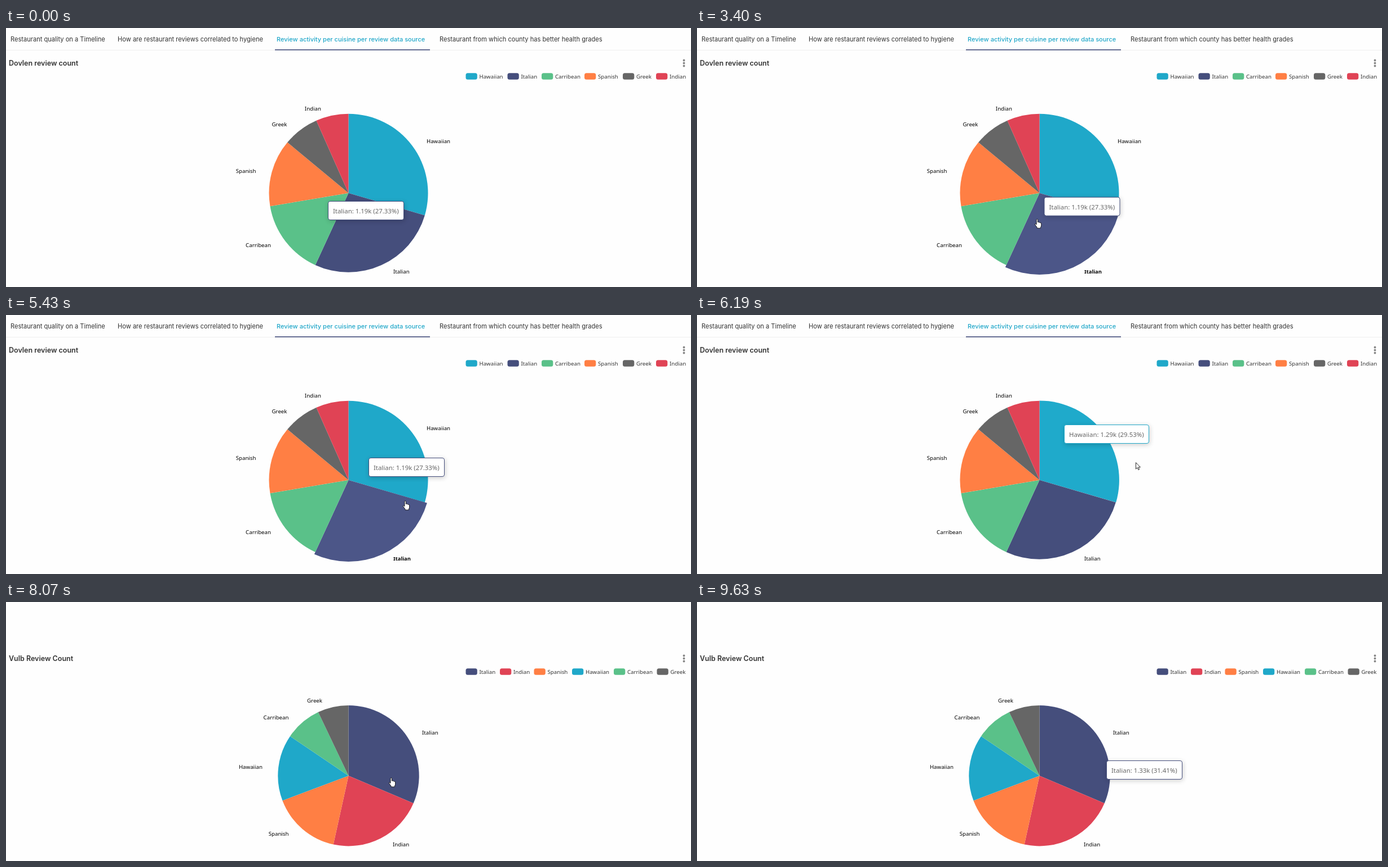
Recreate the animation shown at these times as an HTML page. Size 1215 px wide and 461 px high, loop 9.68 s.

```html
<!DOCTYPE html>
<html lang="en">
<head>
<meta charset="utf-8">
<title>Review activity</title>
<style>
  html, body { margin: 0; width: 100%; height: 100%; overflow: hidden; background: #fefefe; }
  #stage { position: relative; width: 1215px; height: 461px; overflow: hidden; }
  #page { position: absolute; left: 0; top: 0; }
  svg { display: block; }
  .tab { font: 400 11.1px Inter, sans-serif; fill: #323232; }
  .tab.on { fill: #20a7c9; font-weight: 500; font-size: 11px; }
  .title { font: 600 12.5px Inter, sans-serif; fill: #333; }
  .legend { font: 9.7px "Noto Sans", sans-serif; fill: #333; }
  .label { font: 9.7px "Noto Sans", sans-serif; fill: #000; }
  .label.on { font-weight: 700; font-size: 9.4px; }
  #tip {
    position: absolute; left: 0; top: 0; box-sizing: border-box; height: 34px;
    padding: 1px 8px 0; border: 1px solid; border-radius: 4px; background: #fff;
    box-shadow: 1px 2px 9px rgba(0, 0, 0, .2);
    font: 11.4px/32px "Noto Sans", sans-serif; color: #666; white-space: nowrap;
  }
  #pointer { position: absolute; left: 0; top: 0; overflow: visible; }
  #pointer path { fill: #fff; stroke: #111; stroke-width: .9; stroke-linejoin: round; }
</style>
</head>
<body>
<div id="stage">
  <div id="page">
    <svg id="art" width="1215" height="910"></svg>
    <div id="tip"></div>
  </div>
  <svg id="pointer" width="1" height="1">
    <path id="arrow" d="M0 0V11.5L2.7 9L4.4 13L6.2 12.2L4.5 8.3H8Z"/>
    <path id="hand" d="M-1 1.3Q-1 0 .2 0T1.4 1.3V5.3Q2.7 4.6 3.6 5.8Q4.9 5.2 5.8 6.5Q7.6 6.2 7.6 8V11Q7.6 13 6.4 14.2V16H0V14.5L-3.6 9.6Q-4 8.2-2.6 8.2L-1 9.6Z"/>
  </svg>
</div>
<script>
const LOOP = 9680, CX = 607.5;
const COLORS = {
  Hawaiian: [31, 168, 201], Italian: [69, 78, 124], Carribean: [90, 193, 137],
  Spanish: [255, 127, 68], Greek: [102, 102, 102], Indian: [224, 67, 85]
};

// slice: name, percent, value, label x, label y, legend x
const CHARTS = [
  { title: 'Dovlen review count', top: 62.5, cy: 293.8, r: 141, slices: [
    ['Hawaiian', 29.53, '1.29k', 746, 201.5, 815.5],
    ['Italian', 27.33, '1.19k', 687, 433, 889.5],
    ['Carribean', 15.49, '675', 470, 386.5, 950],
    ['Spanish', 13.70, '597', 443.5, 254, 1026],
    ['Greek', 7.32, '319', 498.5, 171.5, 1094],
    ['Indian', 6.63, '289', 559, 143.5, 1153]] },
  { title: 'Vulb Review Count', top: 542.5, cy: 751.2, r: 125.2, slices: [
    ['Italian', 31.41, '1.33k', 738, 674.5, 815.5],
    ['Indian', 22.03, '933', 686, 873, 876],
    ['Spanish', 15.80, '669', 501.5, 854, 936.5],
    ['Hawaiian', 15.25, '646', 455, 735, 1004],
    ['Carribean', 8.45, '358', 501.5, 647, 1078],
    ['Greek', 7.06, '299', 561, 617, 1154.5]] }
];

// hover: chart, slice, start, end
const HOVERS = [
  [0, 'Italian', -900, -500], [0, 'Hawaiian', 1700, 2700], [0, 'Italian', 2700, 3500],
  [0, 'Carribean', 3500, 4150], [0, 'Spanish', 4150, 4500], [0, 'Greek', 4500, 5090],
  [0, 'Indian', 5090, 5140], [0, 'Hawaiian', 5140, 5250], [0, 'Italian', 5250, 5560],
  [0, 'Hawaiian', 5560, 6080], [1, 'Italian', 8150, 8330], [1, 'Indian', 8330, 8620],
  [1, 'Spanish', 8620, 9010], [1, 'Indian', 9010, 9170], [1, 'Italian', 9170, 9330]
];

// moves: start, end, then where to; things rest between moves
const POINTER = { from: [896, 406], moves: [
  [480, 630, 937, 362], [1350, 1700, 748, 289], [1700, 1900, 677, 261],
  [2550, 2800, 662, 324], [3060, 3500, 586, 345], [3500, 3700, 546, 352],
  [4040, 4300, 541, 251], [4390, 4750, 553, 222], [5030, 5150, 612, 250],
  [5150, 5360, 708, 331], [5480, 5680, 641, 239], [6000, 6100, 760, 258],
  [6100, 6550, 851, 281], [7920, 8070, 683, 313], [8150, 8330, 655, 332],
  [8330, 8620, 590, 385], [8620, 8800, 560, 380], [8950, 9170, 680, 340],
  [9170, 9290, 716, 326], [9290, 9450, 874, 310]] };

const TIP = { from: [571, 308], moves: [
  [1700, 2150, 684, 219], [2620, 2920, 672, 280], [3090, 3500, 612, 302],
  [3500, 3950, 556, 308], [4060, 4320, 548, 231], [4390, 4950, 563, 178],
  [5060, 5430, 643, 254], [5490, 5570, 680, 256], [5570, 5880, 651, 195],
  [8149, 8150, 693, 711], [8150, 8330, 682, 735], [8330, 8600, 645, 775],
  [8600, 8880, 570, 778], [8980, 9180, 650, 770], [9180, 9600, 726, 724]] };

const SCROLL = { from: [0], moves: [[6800, 6870, 96], [6930, 7190, 384], [7650, 7740, 442]] };

const $ = id => document.getElementById(id);
const art = $('art'), tip = $('tip');
const clamp = k => Math.min(1, Math.max(0, k));
const linear = k => k;
const easeOut = k => 1 - (1 - k) ** 2;
const rgb = (c, lift = 0) => `rgb(${c.map(v => Math.min(255, Math.round(v * (1 + lift))))})`;

function add(tag, attrs, text) {
  const el = document.createElementNS('http://www.w3.org/2000/svg', tag);
  for (const name in attrs) el.setAttribute(name, attrs[name]);
  if (text) el.textContent = text;
  return art.appendChild(el);
}

function place({ from, moves }, t, ease = linear) {
  return moves.reduce((pos, [start, end, ...to]) => {
    const k = ease(clamp((t - start) / (end - start)));
    return pos.map((v, i) => v + (to[i] - v) * k);
  }, from);
}

function wedge(cy, r, from, to) {
  const at = p => {
    const a = p / 50 * Math.PI;
    return `${CX + r * Math.sin(a)} ${cy - r * Math.cos(a)}`;
  };
  return `M${CX} ${cy}L${at(from)}A${r} ${r} 0 0 1 ${at(to)}Z`;
}

function buildTabs() {
  add('path', { d: 'M0 39.5H1215', stroke: '#f0f0f0' });
  add('rect', { x: 477, y: 38, width: 275, height: 1.6, fill: '#454e7c' });
  [[8, 'Restaurant quality on a Timeline'],
   [198, 'How are restaurant reviews correlated to hygiene'],
   [480, 'Review activity per cuisine per review data source'],
   [769, 'Restaurant from which county has better health grades']
  ].forEach(([x, text], i) => add('text', { x, y: 23.5, class: i === 2 ? 'tab on' : 'tab' }, text));
}

function buildChart(chart) {
  const { title, top, slices } = chart;
  add('text', { x: 5, y: top + 4.7, class: 'title' }, title);
  for (const d of [-5, 0, 5]) add('circle', { cx: 1202.5, cy: top + d, r: 1.9, fill: '#868686' });
  let from = 0;
  chart.parts = slices.map(([name, percent, value, x, y, legendX]) => {
    const color = COLORS[name];
    add('rect', { x: legendX, y: top + 17.8, width: 20.3, height: 11.4, rx: 3.5, fill: rgb(color) });
    add('text', { x: legendX + 24, y: top + 27, class: 'legend' }, name);
    return {
      name, color, from, to: from += percent,
      note: `${name}: ${value} (${percent.toFixed(2)}%)`,
      path: add('path', {}),
      label: add('text', { x, y: y + 3.5, class: 'label', 'text-anchor': x > CX ? 'start' : 'end' }, name)
    };
  });
}

function drawSlices(t) {
  CHARTS.forEach((chart, c) => chart.parts.forEach(part => {
    let lift = 0, on = false;
    for (const [hc, name, start, end] of HOVERS) {
      if (hc !== c || name !== part.name || t < start) continue;
      const rise = easeOut(clamp((Math.min(t, end) - start) / 160));
      lift = Math.max(lift, rise * (1 - easeOut(clamp((t - end) / 160))));
      on = on || t < end;
    }
    part.path.setAttribute('d', wedge(chart.cy, chart.r + 4.2 * lift, part.from, part.to));
    part.path.setAttribute('fill', rgb(part.color, .1 * lift));
    part.label.classList.toggle('on', on);
  }));
}

function drawTip(t) {
  const [c, name] = HOVERS.filter(h => h[2] <= t).pop();
  const part = CHARTS[c].parts.find(p => p.name === name);
  const [x, y] = place(TIP, t, easeOut);
  if (tip.textContent !== part.note) tip.textContent = part.note;
  tip.style.borderColor = rgb(part.color);
  tip.style.transform = `translate(${x}px, ${y}px)`;
}

function drawPointer(t, scroll) {
  const [x, y] = place(POINTER, t);
  const overPie = CHARTS.some(({ cy, r }) => Math.hypot(x - CX, y + scroll - cy) < r);
  $('pointer').style.display = t >= 480 && t < 9560 ? 'block' : 'none';
  $('pointer').style.transform = `translate(${x}px, ${y}px)`;
  $('hand').style.display = overPie ? '' : 'none';
  $('arrow').style.display = overPie ? 'none' : '';
}

function draw(now) {
  const t = now % LOOP;
  const scroll = Math.round(place(SCROLL, t)[0]);
  $('page').style.transform = `translateY(${-scroll}px)`;
  drawSlices(t);
  drawTip(t);
  drawPointer(t, scroll);
}

buildTabs();
CHARTS.forEach(buildChart);
const begin = performance.now();
function tick() {
  draw(performance.now() - begin);
  requestAnimationFrame(tick);
}
tick();
</script>
</body>
</html>
```
